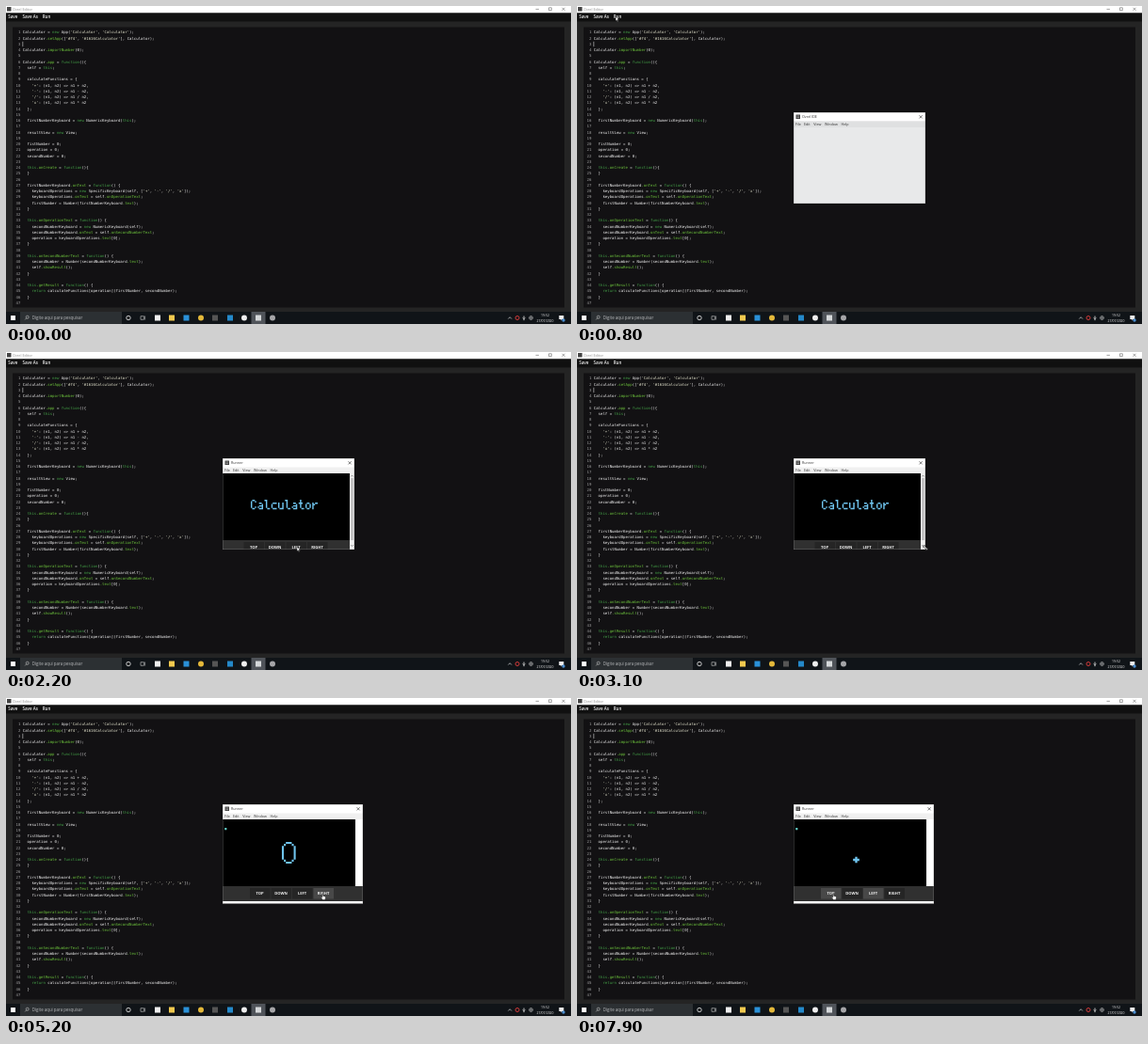
These frames come from a looping animation (600 by 338 pixels, 8 s). An HTML page:

```html
<!DOCTYPE html>
<html lang="pt">
<head>
<meta charset="utf-8">
<title>Editor</title>
<style>
  html, body { margin: 0; width: 100%; height: 100%; overflow: hidden; background: #111; }
  #stage { display: block; width: 600px; height: 338px; font-family: "Open Sans", "Noto Sans", sans-serif; }
  .code { font: 4px/1 "DejaVu Sans Mono", monospace; fill: #f2f2f2; white-space: pre; }
  .num { fill: #a2a2a2; text-anchor: end; }
  .kw { fill: #43a047; }
  .prop { fill: #6cc23c; }
  .str { fill: #e9e9d2; }
  .top { font-size: 4.5px; font-weight: 600; fill: #eee; }
  .small { font-size: 3.7px; fill: #333; }
  .btn text { font-size: 4.1px; font-weight: 700; fill: #f4f4f4; text-anchor: middle; }
  .pix path { fill: none; stroke: #6fc4ee; stroke-linecap: square; }
</style>
</head>
<body>
<svg id="stage" viewBox="0 0 600 338">
  <rect width="600" height="338" fill="#242424"/>
  <rect width="600" height="7.5" fill="#fff"/>
  <rect x="1" y="1" width="4.5" height="4.5" fill="#444"/>
  <text x="7" y="4.8" font-size="3.8" fill="#8c8c8c">Ovrel Editor</text>
  <path d="M562.5 3.4h3.4M576.5 1.8h2.8v2.8h-2.8zM590.5 1.8l3 3m0-3l-3 3" fill="none" stroke="#555" stroke-width=".55"/>
  <rect y="7.5" width="600" height="9" fill="#101010"/>
  <g class="top">
    <text x="2.2" y="13.3">Save</text><text x="17.5" y="13.3">Save As</text><text x="38.7" y="13.3">Run</text>
  </g>
  <rect x="7" y="22.5" width="586" height="298" fill="#121113"/>
  <g id="code"></g>
  <path d="M17.8 37.8v5.4" stroke="#ddd" stroke-width=".6"/>

  <g id="taskbar">
    <rect y="325" width="600" height="13" fill="#101418"/>
    <rect x="5" y="329" width="5" height="5" fill="#fff"/>
    <rect x="15" y="325" width="108" height="13" fill="#2c3033"/>
    <path d="M20.2 333.4l1.7-1.8" stroke="#ccc" stroke-width=".6"/>
    <circle cx="22.7" cy="330.7" r="1.5" fill="none" stroke="#ccc" stroke-width=".6"/>
    <text x="27.8" y="333.2" font-size="4.4" fill="#b9bbbd">Digite aqui para pesquisar</text>
    <circle cx="130" cy="331.5" r="2.2" fill="none" stroke="#eee" stroke-width=".8"/>
    <path d="M143 329.7h3.4v3.6H143zM147.6 329.5v4" fill="none" stroke="#ccc" stroke-width=".6"/>
    <rect x="260.5" y="325" width="15" height="13" fill="#50545a"/>
    <g id="icons"></g>
    <path d="M533.3 332.5l1.8-1.8 1.8 1.8" fill="none" stroke="#ddd" stroke-width=".7"/>
    <circle cx="543" cy="331.5" r="2" fill="none" stroke="#d33a3a"/>
    <path d="M550 329.5v2.5M548.6 331.5q1.4 2.6 2.8 0M550 333v1.2" fill="none" stroke="#eee" stroke-width=".8"/>
    <circle cx="557.5" cy="331.5" r="1.9" fill="none" stroke="#ccc" stroke-width=".6"/>
    <path d="M555.6 331.5h3.8M557.5 329.6v3.8" stroke="#ccc" stroke-width=".4"/>
    <g fill="#eee" text-anchor="middle" font-size="3.5">
      <text x="572.5" y="330.2">19:52</text><text x="572.5" y="336.2" font-size="3.4">27/07/2020</text>
    </g>
    <path d="M587.3 329h5v4h-2l-1 1.4v-1.4h-2z" fill="#eee"/>
    <circle cx="592" cy="334" r="1.7" fill="#4c8fd0"/>
  </g>

  <svg id="win" x="230" y="113">
    <rect id="body" width="160" height="120"/>
    <rect width="160" height="9.5" fill="#fff"/>
    <rect x="2.5" y="2.5" width="4.5" height="4.5" fill="#444"/>
    <path d="M3.5 4h2.5M3.5 5.6h2.5" stroke="#ddd" stroke-width=".5"/>
    <text id="title" class="small" x="9" y="6.3"></text>
    <path id="close" d="M0 3.2l3.2 3.2m0-3.2l-3.2 3.2" stroke="#222" stroke-width=".6"/>
    <rect id="menubar" y="9.5" width="160" height="6.5"/>
    <g id="menu" class="small"></g>
    <g id="runner">
      <rect id="screen" y="16" height="71" fill="#000"/>
      <g class="pix">
        <g id="splash" transform="translate(30.7 44.8) scale(1.45)"></g>
        <g id="digit" transform="translate(64 41) scale(2.1)"><path/></g>
        <path id="plus" d="M64.3 59h4.4M66.5 56.8v4.4" stroke-width="2.3"/>
        <path id="typed" d="M3.3 19.6h4.6v2.7l-4.6 1.7v1.9h4.9" stroke-width="1.8"/>
      </g>
      <rect id="dot" x="2.2" y="25" width="2.2" height="2.2" rx=".5" fill="#62cfc8"/>
      <rect id="bar" y="87" height="16" fill="#303030"/>
      <g id="buttons"></g>
      <g id="scroll">
        <rect x="135" y="16" width="10" height="90" fill="#f0f0f0"/>
        <rect x="136" y="21" width="3" height="66" fill="#c4c4c4"/>
        <path d="M136.2 19.5l1.3-1.5 1.3 1.5M136.2 92l1.3 1.5 1.3-1.5" fill="none" stroke="#666" stroke-width=".6"/>
      </g>
    </g>
    <rect id="frame" fill="none" stroke="#8a8a8a" stroke-width=".6"/>
  </svg>

  <g id="cursor" stroke="#111" stroke-width=".5" stroke-linejoin="round">
    <path id="arrow" d="M0 0v5l1.2-1.1.8 1.8.8-.4-.8-1.7h1.6z" fill="#fff"/>
    <path id="hand" d="M-.3 0q.6-.7 1 0v2.3l2.2.6q.7.3.6 1l-.5 2.5H.3L-1.7 4q-.2-.8.6-.6l.8.7z" fill="#fff"/>
    <path id="resize" d="M-2.2-2.2h2l-.6.6 2.4 2.4.6-.6v2h-2l.6-.6-2.4-2.4-.6.6z" fill="#fff"/>
  </g>
</svg>
<script>
const LOOP = 8000;
const source = `Calculator = new App('Calculator', 'Calculator');
Calculator.setApp(['#f4', '#1616Calculator'], Calculator);

Calculator.importNumber(0);

Calculator.app = function(){
  self = this;

  calculateFunctions = {
    '+': (n1, n2) => n1 + n2,
    '-': (n1, n2) => n1 - n2,
    '/': (n1, n2) => n1 / n2,
    'x': (n1, n2) => n1 * n2
  };

  firstNumberKeyboard = new NumericKeyboard(this);

  resultView = new View;

  fistNumber = 0;
  operation = 0;
  secondNumber = 0;

  this.onCreate = function(){
  }

  firstNumberKeyboard.onText = function() {
    keyboardOperations = new SpecificKeyboard(self, ['+', '-', '/', 'x']);
    keyboardOperations.onText = self.onOperationText;
    firstNumber = Number(firstNumberKeyboard.text);
  }

  this.onOperationText = function() {
    secondNumberKeyboard = new NumericKeyboard(self);
    secondNumberKeyboard.onText = self.onSecondNumberText;
    operation = keyboardOperations.text[0];
  }

  this.onSecondNumberText = function() {
    secondNumber = Number(secondNumberKeyboard.text);
    self.showResult();
  }

  this.getResult = function() {
    return calculateFunctions[operation](firstNumber, secondNumber);
  }
`;

const $ = id => document.getElementById(id);

function add(parent, tag, attrs, text) {
  const node = document.createElementNS('http://www.w3.org/2000/svg', tag);
  set(node, attrs);
  if (text) node.textContent = text;
  return parent.appendChild(node);
}

function set(node, attrs) {
  for (const key in attrs) node.setAttribute(key, attrs[key]);
}

function show(id, visible) {
  $(id).style.display = visible ? '' : 'none';
}

const token = /(\b(?:new|this|function|return)\b|'[^']*'|\.[a-zA-Z]+)/;
source.split('\n').forEach((line, i) => {
  const y = 29.4 + i * 6.25;
  add($('code'), 'text', { class: 'code num', x: 15.4, y }, String(i + 1));
  const row = add($('code'), 'text', { class: 'code', x: 17.8, y });
  line.split(token).forEach((part, j) => {
    const kind = j % 2 ? { "'": 'str', '.': 'prop' }[part[0]] || 'kw' : '';
    if (part) add(row, 'tspan', { class: kind }, part);
  });
});

// Taskbar shortcuts: centre, colour, corner radius
[[161, '#f0f0f0', 0], [176, '#f2c94f', 0], [191.5, '#2a91d8', 0], [207, '#e3b83a', 3],
 [222, '#555', 0], [238, '#2489ca', 0], [253, '#eee', 3], [268, '#d5d8da', 0], [283, '#a5a5a8', 3]]
  .forEach(([x, fill, rx]) => add($('icons'), 'rect', { x: x - 3, y: 328.5, width: 6, height: 6, rx, fill }));

[['File', 2], ['Edit', 11], ['View', 21.3], ['Window', 33], ['Help', 50.5]]
  .forEach(([label, x]) => add($('menu'), 'text', { x, y: 14.3 }, label));

// Pixel lettering drawn with unit strokes
const letters = {
  C: 'M1 0h1M3 1h0M0 1v4M3 5h0M1 6h1',
  a: 'M1 2h1M3 3v3M1 4h1M0 5h0M1 6h1',
  l: 'M0 0h1v5M2 6h1',
  c: 'M1 2h2M0 3v2M1 6h2',
  u: 'M0 2v3M3 2v4M1 6h1',
  t: 'M1 0v5M0 2h2M2 6h1',
  o: 'M1 2h1M0 3v2M3 3v2M1 6h1',
  r: 'M0 2v4M1 3h0M2 2h1'
};
[...'Calculator'].forEach((ch, i) =>
  add($('splash'), 'path', { d: letters[ch], transform: `translate(${i * 5} 0)` }));

const digits = [
  'M2 0h2M1 1h0M5 1h0M0 2v6M6 2v6M1 9h0M5 9h0M2 10h2',
  'M3 0v9M2 1h0M1 2h0M1 10h4',
  'M2 0h2M1 1h0M5 1h0M0 2h0M6 2v1M5 4h0M4 5h0M3 6h0M2 7h0M1 8h0M0 9h0M0 10h6'
];

const buttons = ['TOP', 'DOWN', 'LEFT', 'RIGHT'].map((label, i) => {
  const x = 39.5 + i * 22.5;
  const g = add($('buttons'), 'g', { class: 'btn' });
  const face = add(g, 'rect', { x: x - 10.5, y: 89, width: 21.5, height: 11.5 });
  add(g, 'text', { x, y: 96 }, label);
  return { x, face };
});

// Pointer path: time, x, y
const path = [
  [200, 110, 60], [600, 41, 11], [1000, 41, 11], [1400, 269, 206], [1900, 269, 206],
  [2600, 370, 208], [3100, 370, 208], [4000, 379, 217], [4200, 379, 217], [4700, 336, 208],
  [5900, 336, 208], [6400, 292, 208], [7100, 292, 208], [7350, 314, 208], [7550, 314, 208], [7850, 272, 208]
];

function pointer(t) {
  const next = path.findIndex(p => p[0] > t);
  if (next < 0) return path[path.length - 1].slice(1);
  if (next === 0) return path[0].slice(1);
  const [a, b] = [path[next - 1], path[next]];
  const k = (t - a[0]) / (b[0] - a[0]);
  const e = k * k * (3 - 2 * k);
  return [a[1] + (b[1] - a[1]) * e, a[2] + (b[2] - a[2]) * e];
}

const OPEN = 700, READY = 1000, RUN = 2000, INPUT = 4000, ONE = 5500, TWO = 5800, TYPED = 6700, OPERATOR = 7500;

function draw(t) {
  const [px, py] = pointer(t);
  const grow = t < 3100 ? 0 : Math.min(1, (px - 370) / 9);
  const size = t < 4000 ? grow : 1;
  const w = 140 + 9 * size, h = 97 + 8.5 * size;
  const running = t >= RUN;
  const scrolls = size < .8;

  show('win', t >= OPEN);
  set($('win'), { width: w, height: h });
  set($('frame'), { width: w, height: h });
  set($('close'), { transform: `translate(${w - 6.5} 0)` });
  set($('body'), { fill: t < READY ? '#e8e9ea' : '#fff' });
  set($('menubar'), { fill: t < READY ? '#dfe0e1' : '#f0f0f0' });
  const title = running ? 'Runner' : 'Ovrel IDE';
  if ($('title').textContent !== title) $('title').textContent = title;

  show('runner', running);
  show('scroll', scrolls);
  set($('screen'), { width: 135 + 6 * size });
  set($('bar'), { width: scrolls ? 135 : w });
  const shift = (size - 1) * 6.5;
  set($('buttons'), { transform: `translate(${shift} 0)` });

  show('splash', t < INPUT);
  show('digit', t >= INPUT && t < OPERATOR);
  const value = t < ONE ? 0 : t < TWO ? 1 : 2;
  set($('digit').firstElementChild, { d: digits[value] });
  show('plus', t >= OPERATOR);
  show('typed', t >= TYPED && t < OPERATOR);
  show('dot', t >= INPUT && (t < TYPED || t >= OPERATOR));

  const focus = t < ONE ? -1 : t < TYPED ? 3 : t < OPERATOR ? 1 : 2;
  let over = false;
  buttons.forEach(({ x, face }, i) => {
    const hover = t > INPUT && Math.abs(px - 230 - x - shift) < 10.8 && py < 214;
    over = over || hover;
    set(face, { fill: hover || i === focus ? '#484848' : '#252525' });
  });

  const resizing = t >= 2550 && t < 4250;
  show('cursor', t >= 200);
  show('resize', resizing);
  show('hand', over && !resizing);
  show('arrow', !over && !resizing);
  set($('cursor'), { transform: `translate(${px} ${py})` });
}

const start = performance.now();
function tick() {
  draw((performance.now() - start) % LOOP);
  requestAnimationFrame(tick);
}
tick();
</script>
</body>
</html>
```
